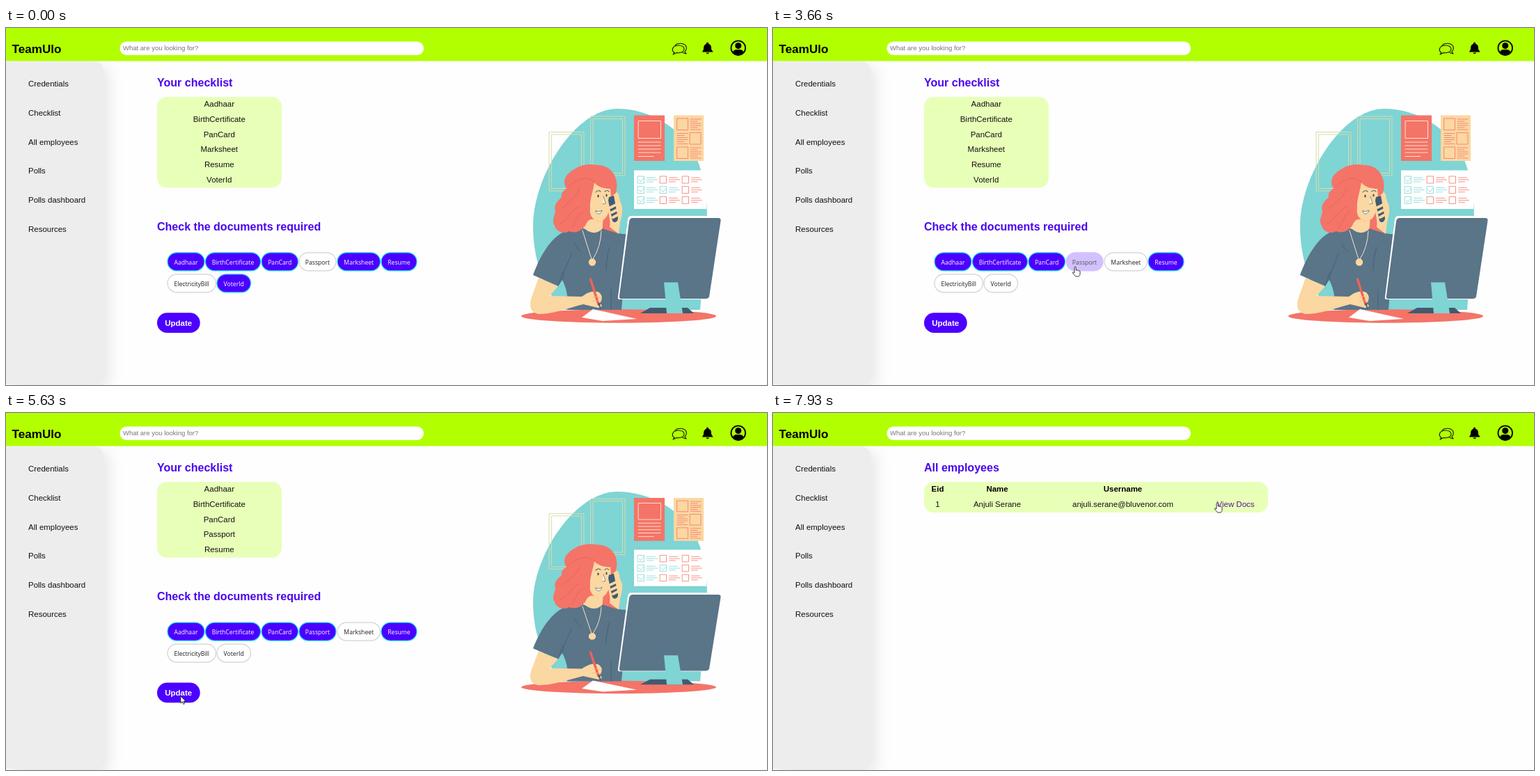
Write an HTML page that moves like this. It is 1093 px wide and 513 px high and loops after 8 s.

```html
<!DOCTYPE html>
<html lang="en">
<head>
<meta charset="utf-8">
<title>Onboarding checklist</title>
<style>
html, body { margin: 0; width: 100%; height: 100%; overflow: hidden; background: #fefefe }
svg { display: block; width: 100%; height: 100% }
text { font: 11.47px "Liberation Sans", Arial, sans-serif; fill: #111 }
.brand { font-size: 17.1px; font-weight: bold; fill: #000 }
.head { font-size: 16.05px; font-weight: bold; fill: #4a06ee }
.wait { font-size: 16px; fill: #000 }
.hint { font-size: 9.5px; fill: #757575 }
.bold { font-weight: bold; fill: #000 }
.mid { text-anchor: middle }
.chip { font: 8.65px "Open Sans", "Noto Sans", sans-serif; text-anchor: middle }
.status { font: 8.1px "Open Sans", "Noto Sans", sans-serif; fill: #fff }
#side { filter: drop-shadow(7px 7px 11px rgba(0, 0, 0, .1)) }
.line { fill: none; stroke-linecap: round; stroke-linejoin: round }
</style>
</head>
<body>
<svg viewBox="0 0 1093 513" preserveAspectRatio="none">
  <g id="frame">
    <path id="side" d="M0 48H126a14 14 0 0 1 14 14V497a14 14 0 0 1-14 14H0Z" fill="#ededed"/>
    <rect width="1093" height="47.5" fill="#b2ff00"/>
    <text x="8.5" y="35.5" class="brand">TeamUlo</text>
    <rect x="163.5" y="19.5" width="436.5" height="19.5" rx="9.7" fill="#fff"/>
    <text x="168" y="32" class="hint">What are you looking for?</text>
    <g class="line" stroke="#111" stroke-width="1.1">
      <path d="M961 25C964 21 975 21 977 27C978 31 976 33 975 34L977 37L972 35.5"/>
      <path d="M960 35.5C955 32 957 25 966 25C976 25 977 35 967 35.5C965 36 964 35.5 963 35.5L958 38Z" fill="#b2ff00"/>
    </g>
    <path d="M1007.5 20.5C1009 20.5 1009 22 1009 22.5C1013 24 1013 27 1013 30C1013 32 1015.5 33 1015.5 34.5H1000C1000 33 1002 32 1002 30C1002 27 1002.5 24 1006 22.5C1006 22 1006 20.5 1007.5 20.5ZM1005.5 35.5H1010A2.3 2.3 0 0 1 1005.5 35.5Z"/>
    <circle cx="1051.7" cy="28.7" r="10.3" fill="none" stroke="#000" stroke-width="1.8"/>
    <circle cx="1051.7" cy="25.5" r="4.5"/>
    <path d="M1044 35C1045 31 1048 31 1051.7 31S1058 31 1059.5 35C1056 39 1047 39 1044 35Z"/>
    <rect id="pill" x="15" width="107.5" height="30.5" rx="15.2" fill="#6320ff"/>
    <g id="menu"></g>
    <text id="title" x="217" y="84" class="head"></text>
  </g>

  <g id="docs">
    <rect id="card" x="217" y="99" width="179" rx="14" fill="#e8ffb8"/>
    <g id="list"></g>
    <g id="lower">
      <text x="217" y="291" class="head">Check the documents required</text>
      <g id="chips"></g>
      <rect x="217" y="409.3" width="61.7" height="28.7" rx="14.3" fill="#4c00ff"/>
      <text x="247.7" y="427.7" class="mid" style="font-weight:bold;fill:#fff">Update</text>
    </g>
    <g id="art">
      <path d="M878 116C924 116 972 143 993 190C1003 214 1007 245 1007 275L997 405H800C774 380 757 335 757 284C757 214 817 116 878 116Z" fill="#7fd4d4"/>
      <g class="line" stroke="#d8dcae">
        <path d="M780.5 149.5H830V234H780.5ZM784 153H826.5V230.5H784ZM840 127H889V212H840ZM843.5 130.5H885.5V208.5H843.5Z"/>
      </g>
      <path d="M902 125.5H946V191H902Z" fill="#f47468"/>
      <path d="M908.5 133.5H940.5V158.5H908.5ZM908 164H940M908 169H940M908 174H940M908 179H940M908 184.5H930" class="line" stroke="#fbe3cf"/>
      <path d="M959 125.5H1002V191H959Z" fill="#fbd7a1"/>
      <path d="M902 204.5H1006V260H902Z" fill="#fff"/>
      <g id="notes" class="line"></g>

      <!-- desk and figure -->
      <ellipse cx="880" cy="414" rx="140" ry="9.7" fill="#f47468"/>
      <path d="M860 262C876 262 884 276 878 288C884 297 876 307 868 303L850 290Z" fill="#f47468"/>
      <path d="M832 262L858 270L856 296L842 305L822 294Z" fill="#fbd7a1"/>
      <path d="M804 292C815 288 823 286 832 289C840 296 850 296 857 288C870 293 884 297 893 296L884 405H806C808 390 806 376 799 362L793 371L757 355C763 338 780 300 804 292Z" fill="#5a7488"/>
      <path d="M807 210C820 197 836 194 848 197C868 196 882 214 876 236C875 246 870 252 866 258L850 278C842 272 836 274 832 284C824 294 816 295 808 292C802 297 790 293 788 284C783 277 789 268 789 264C786 252 794 248 798 243C797 237 801 233 805 231C800 223 802 215 807 210Z" fill="#f47468"/>
      <path d="M845 222C850 229 861 231 868 231C870 246 868 258 865 266C861 277 853 280 846 276C840 272 838 266 839 259C838 247 843 236 845 222Z" fill="#fbd7a1"/>
      <path d="M863 253C865 247 870 242 877 236C882 238 880 246 883 251C887 258 885 270 882 279L880 296L867 286C869 278 865 266 863 253Z" fill="#fbd7a1"/>
      <path d="M866 243L873 241L879 273C879 279 873 281 871 277L865 248Z" fill="#405b72"/>
      <path d="M868 258L878 253M870 265L880 260M872 272L881 267" class="line" stroke="#fbd7a1" stroke-width="4"/>
      <g class="line" stroke="#405b72">
        <path d="M847 236Q850 232 854 235M860 235Q863 232 866 235" stroke-width="1.1"/>
        <path d="M858 242L861 252L857 253M847 263Q852 265 856 262Q854 268 850 267Q848 266 847 263Z" fill="#fff" stroke-width=".7"/>
        <path d="M799 362C801 346 809 335 812 325M793 371L800 350M817 310Q821 318 825 321M867 315Q862 330 862 348M869 376V405" stroke-width=".8"/>
      </g>
      <ellipse cx="850.5" cy="241.5" rx="1.1" ry="2" fill="#304454"/>
      <ellipse cx="862.5" cy="240.5" rx="1" ry="2" fill="#304454"/>
      <path d="M808 228C820 217 834 211 846 222M798 260C808 248 818 247 824 230M795 281C808 276 810 263 823 257M812 288C821 277 818 270 829 264" class="line" stroke="#e85f58" stroke-width=".8"/>
      <path d="M828 291L841 332M855 292Q854 315 843 332" class="line" stroke="#fbe3cf"/>
      <circle cx="842" cy="336.5" r="5.2" fill="#fbd7a1"/>
      <path d="M765 359L793 371C788 377 784 381 781 385L827 386C835 380 842 377 850 379C858 383 857 393 851 396C858 397 857 402 850 402L829 397C806 403 785 411 765 411C751 409 751 396 756 384Z" fill="#fbd7a1"/>
      <path d="M843 404L906 418L857 421L827 416Z" fill="#fff"/>
      <path d="M839.5 361L851 397" class="line" stroke="#f0625a" stroke-width="3.4"/>
      <path d="M850 396L854.5 406L853 395Z" fill="#405b72"/>
      <path d="M843 387Q851 384 855 389M842 393Q849 390 855 394" class="line" stroke="#e9b987" stroke-width=".8"/>

      <!-- computer -->
      <path d="M925 402H979L988 410H911Z" fill="#405b72"/>
      <path d="M898 270H1023Q1027 270 1026 275L1009 386Q1008 390 1004 390H882Q878 390 879 386L893 275Q894 270 898 270Z" fill="#fff"/>
      <path d="M900 273H1023Q1027 273 1026.5 277L1010 386Q1009 389 1005 389H884Q880 389 881 385L895 278Q896 273 900 273Z" fill="#5a7488"/>
      <path d="M945 365.5H965L972 410H949Z" fill="#7fd4d4"/>
    </g>
  </g>

  <text id="wait" x="217" y="118.5" class="wait">Loading...</text>
  <g id="staff">
    <rect x="217" y="99" width="494" height="44" rx="14" fill="#e8ffb8"/>
  </g>
  <g id="status">
    <path id="bar"/>
    <text id="note" y="508.3" class="status"></text>
  </g>
  <g id="cursor" stroke="#222" stroke-width=".9" stroke-linejoin="round" fill="#fff">
    <path id="arrow" d="M0 0V10L2.4 8L4 11.7L5.7 11L4.2 7.5H7.2Z"/>
    <path id="hand" d="M-1 1.2C-1 -.4 1.2 -.4 1.2 1.2V5.2C2 4.4 3.3 4.7 3.3 5.6C4 4.8 5.2 5.2 5.3 6.1C6.2 5.6 7 6.2 7 7.2V10C7 12 6 13.7 5 14H.7C-.8 12.5 -2.5 10.5 -3.6 8.8C-4 7.7 -2.5 7.2 -1 8.8Z"/>
  </g>
</svg>
<script>
const $ = id => document.getElementById(id);
const text = (x, y, s, cls = '', more = '') => `<text x="${x}" y="${y}" class="${cls}" ${more}>${s}</text>`;
const show = (id, on) => $(id).style.display = on ? '' : 'none';
const clamp = v => Math.max(0, Math.min(1, v));
const ramp = (t, start, span) => clamp((t - start) / span);
const mix = (a, b, k) => `rgb(${a.map((v, i) => Math.round(v + (b[i] - v) * k))})`;

const ROW = 21.77, PITCH = 41.8;
const menu = ['Credentials', 'Checklist', 'All employees', 'Polls', 'Polls dashboard', 'Resources'];
$('menu').innerHTML = menu.map((s, i) => text(32, Math.round(84 + i * PITCH), s)).join('');

// label, x, width, row
const chips = [
  ['Aadhaar', 231.5, 54, 0], ['BirthCertificate', 286, 80, 0], ['PanCard', 366.5, 53.5, 0],
  ['Passport', 420.5, 54, 0], ['Marksheet', 475.5, 62.5, 0], ['Resume', 538.5, 52, 0],
  ['ElectricityBill', 231.5, 70.5, 1], ['VoterId', 302.5, 49.5, 1]
];
$('chips').innerHTML = chips.map(([s, x, w, r]) =>
  `<rect x="${x + .5}" y="${322.8 + r * 31}" width="${w - 1}" height="26" rx="13" stroke-width="1.2"/>` +
  text(x + w / 2, 339.6 + r * 31, s, 'chip')).join('');

const cells = [[236.5, 'Eid', '1'], [322, 'Name', 'Anjuli Serane'], [502.5, 'Username', 'anjuli.serane@bluvenor.com']];
$('staff').innerHTML += cells.map(([x, h, v]) => text(x, 113, h, 'mid bold') + text(x, 135, v, 'mid')).join('') +
  text(664.5, 135, 'View Docs', 'mid', 'style="fill:#551a8b"');

// wall notes: outlined boxes and rows of short strokes
const stroke = (d, color, w = 1) => `<path d="${d}" stroke="${color}" stroke-width="${w}"/>`;
let notes = '';
for (let r = 0; r < 3; r++) {
  const y = 130 + r * 20.5, left = r % 2 ? 982.5 : 964, right = r % 2 ? 964 : 983;
  let d = `M${left} ${y}h15.5v16.5h-15.5Z`;
  for (let k = 0; k < 6; k++) d += `M${right} ${y + 1 + k * 3}h${k % 3 == 1 ? 10 : 15}`;
  notes += stroke(d, '#f47468', .8);
  for (let c = 0; c < 3; c++) {
    const x = 907.5 + c * 32, top = 213 + r * 14.7, done = !c || c == 1 && r == 1;
    d = `M${x} ${top}h9v10h-9Z`;
    for (let k = 0; k < 3; k++) d += `M${x + 13} ${top + 2 + k * 3}h${[12, 15, 9][k]}`;
    if (done) d += `M${x + 2} ${top + 5}l2 3l4 -5`;
    notes += stroke(d, done ? '#7fd4d4' : '#f47468', .8);
  }
}
$('notes').innerHTML = notes;

// time, x, y of the pointer tip
const path = [
  [120, 975, 512], [580, 356, 366], [860, 486, 344], [930, 486, 344], [1270, 488, 343],
  [1750, 488, 343], [2050, 293, 382], [2220, 347, 367], [3310, 347, 367], [3580, 434, 343],
  [3780, 434, 343], [4070, 262, 424], [4360, 256, 414], [5560, 256, 414], [6250, 82, 170],
  [7200, 82, 170], [7930, 638, 129]
];
function pointer(t) {
  const i = path.findIndex(p => p[0] > t);
  if (i < 1) return path[i ? path.length - 1 : 0].slice(1);
  const [a, b] = [path[i - 1], path[i]];
  let k = (t - a[0]) / (b[0] - a[0]);
  k = k * k * (3 - 2 * k);
  return [a[1] + (b[1] - a[1]) * k, a[2] + (b[2] - a[2]) * k];
}

function checked(name, t) {
  if (name == 'Marksheet') return 1 - ramp(t, 1550, 250);
  if (name == 'VoterId') return 1 - ramp(t, 2490, 250);
  if (name == 'Passport') return ramp(t, 3600, 250);
  return name == 'ElectricityBill' ? 0 : 1;
}

function drawDocs(t) {
  const saved = t < 5300 ? 0 : 5300;
  const list = chips.filter(c => checked(c[0], saved) == 1).map(c => c[0]);
  const lift = (list.length - 6) * ROW;
  $('card').setAttribute('height', list.length * ROW);
  $('list').innerHTML = list.map((s, i) => text(306.3, Math.round(113 + i * ROW), s, 'mid')).join('');
  $('lower').setAttribute('transform', `translate(0 ${lift})`);
  $('art').setAttribute('transform', lift ? 'translate(0 3.6) scale(1 .943)' : '');
  const parts = $('chips').children;
  chips.forEach(([s], i) => {
    const k = checked(s, t), box = parts[2 * i].style;
    box.fill = mix([255, 255, 255], [76, 0, 255], k);
    box.stroke = k > 0 && k < 1 ? box.fill : k ? '#18d6f0' : '#d2d2d2';
    parts[2 * i + 1].style.fill = mix([30, 30, 30], [255, 255, 255], k);
  });
}

function draw(now) {
  const t = now % 8000;
  const blank = t >= 6670 && t < 6870, staff = t >= 6870;
  const loading = t >= 5230 && t < 5300 || staff && t < 7010;
  const docs = t < 6670 && !loading;
  show('frame', !blank);
  show('docs', docs);
  show('wait', loading);
  show('staff', staff && !loading);
  $('title').textContent = staff ? 'All employees' : 'Your checklist';
  if (docs) drawDocs(t);

  const [x, y] = pointer(t);
  const over = x > 15 && x < 122.5 ? menu.findIndex((s, i) => Math.abs(y - 80 - i * PITCH) < 15) : -1;
  show('pill', over >= 0);
  $('pill').setAttribute('y', 65.4 + over * PITCH);
  [...$('menu').children].forEach((e, i) => e.style.fill = i == over ? '#e9e2ff' : '');

  const onChip = t < 5230 && x > 231 && x < 591 && y > 322 && y < 381;
  const hand = onChip || t >= 5230 && t < 5560 || over >= 0 && !blank || staff && x > 632;
  show('cursor', t >= 120);
  show('hand', hand);
  show('arrow', !hand);
  $('cursor').setAttribute('transform', `translate(${x} ${y})`);

  const busy = t < 5560;
  $('note').textContent = busy ? 'Connecting...' : 'devserver:4100/hq/allDocs';
  $('bar').setAttribute('d', `M0 497.4H${busy ? 359.4 : 103}q3 0 3 3V513H0Z`);
  $('status').style.opacity = busy ? ramp(t, 4500, 140) : ramp(t, 6240, 150) * (1 - ramp(t, 7270, 140));
  requestAnimationFrame(draw);
}
requestAnimationFrame(draw);
</script>
</body>
</html>
```
